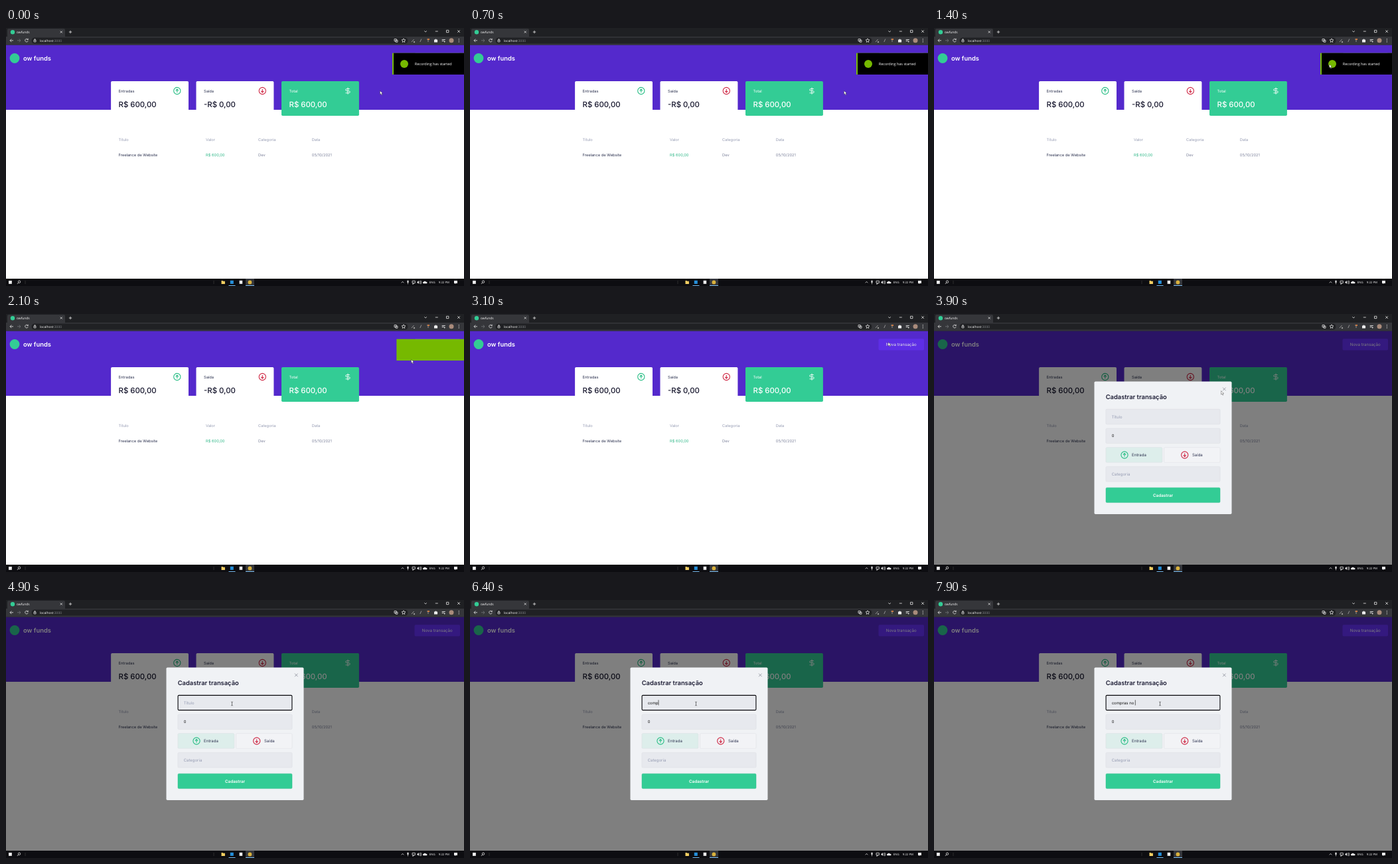
An HTML page for the animation above (8 s loop, 690x388 px).

```html
<!DOCTYPE html>
<html lang="pt">
<head>
<meta charset="utf-8">
<title>Transações</title>
<style>
html, body { margin: 0; width: 100%; height: 100%; overflow: hidden; background: #fff; }
svg { display: block; }
text { font: 5.75px Inter, sans-serif; fill: #2d3350; white-space: pre; text-rendering: geometricPrecision; }
.ui { font: 4.9px "Open Sans", sans-serif; fill: #fff; }
.big { font-size: 11.4px; font-weight: 500; fill: #15152c; }
.white { fill: #fff; }
.muted { fill: #969cb3; }
.line { fill: none; stroke: #e8e8e8; stroke-width: .8; }
.field { fill: #e7e9ee; stroke: #d7d9de; stroke-width: .4; }
.mid { text-anchor: middle; }
#modal .title { font-size: 9.35px; font-weight: 600; fill: #1c1c34; }
#modal .submit { font-size: 6.3px; font-weight: 600; }
#modal .option, #titleText { font-size: 6px; }
#modal.fallback .title, #modal.fallback .submit { font-family: "Liberation Sans", sans-serif; font-weight: 700; }
#modal.fallback .title { font-size: 8.6px; }
#modal.fallback .submit { font-size: 5.75px; }
#modal.fallback .value { font-weight: 600; }
</style>
</head>
<body>
<svg width="690" height="388" viewBox="0 0 690 388">
  <defs>
    <g id="up" fill="none" stroke="#27bd84" stroke-width="1.1">
      <circle r="5.100"/><path d="M0 2.6V-2.4M-2.1-.3L0-2.4 2.1-.3"/>
    </g>
    <g id="down" fill="none" stroke="#cf2744" stroke-width="1.1">
      <circle r="5.100"/><path d="M0-2.6V2.4M-2.1 .3L0 2.4 2.1 .3"/>
    </g>
  </defs>

  <!-- page -->
  <rect y="25" width="690" height="98" fill="#5429cc"/>
  <circle cx="13" cy="45.500" r="7.400" fill="#33cc95"/>
  <text x="26" y="48.600" class="white" style="font-size:9.4px;font-weight:600">ow funds</text>
  <g id="newButton">
    <rect x="615.500" y="37.300" width="68.500" height="17.200" rx="1.800" fill="#6933ff"/>
    <text x="649.700" y="48" class="white mid" style="font-size:6.200px">Nova transação</text>
  </g>

  <g fill="#fff">
    <rect x="158.100" y="80" width="116.900" height="52" rx="1.800"/>
    <rect x="286.500" y="80" width="116.900" height="52" rx="1.800"/>
    <rect x="415" y="80" width="116.900" height="52" rx="1.800" fill="#33cc95"/>
  </g>
  <text x="169.500" y="96.600">Entradas</text>
  <text x="298" y="96.600">Saída</text>
  <text x="426.500" y="96.600" class="white">Total</text>
  <text x="169.500" y="118.600" class="big">R$ 600,00</text>
  <text x="298" y="118.600" class="big">-R$ 0,00</text>
  <text x="426.500" y="118.600" class="big white">R$ 600,00</text>
  <use href="#up" x="257.800" y="94.500"/>
  <use href="#down" x="386.300" y="94.500"/>
  <path d="M515 89.500v10.200M517.800 91.500h-4.400a1.500 1.500 0 0 0 0 3.100h3.200a1.500 1.500 0 0 1 0 3.100h-5" fill="none" stroke="#fff" stroke-width=".9"/>

  <text x="169.500" y="169.700" class="muted">Título</text>
  <text x="301" y="169.700" class="muted">Valor</text>
  <text x="380" y="169.700" class="muted">Categoria</text>
  <text x="460.800" y="169.700" class="muted">Data</text>
  <text x="169.500" y="193">Freelance de Website</text>
  <text x="301" y="193" style="fill:#33b98a">R$ 600,00</text>
  <text x="380" y="193" style="fill:#7d829b">Dev</text>
  <text x="460.800" y="193" style="fill:#7d829b">05/10/2021</text>

  <!-- dialog -->
  <g id="modal">
    <rect y="25" width="690" height="352" opacity=".5"/>
    <rect id="panel" x="241.500" width="207" rx="1.800" fill="#f0f2f5"/>
    <text x="258.700" y="128.300" class="title">Cadastrar transação</text>
    <path d="M435 110.600l4.600 4.600M439.600 110.600l-4.600 4.600" class="line" style="stroke:#8b8d98"/>
    <g id="form">
      <rect x="258.900" y="143.100" width="172.200" height="22.700" rx="1.600" class="field"/>
      <rect id="focusRing" x="259.100" y="143.400" width="171.800" height="22.200" rx="1.400" fill="none" stroke="#08080c" stroke-width="1.100"/>
      <text id="titleText" x="267.700" y="156.700"></text>
      <path id="caret" d="M0 150.400v8" stroke="#222" stroke-width=".7"/>
      <rect x="258.900" y="171.900" width="172.200" height="22.700" rx="1.600" class="field"/>
      <text x="267.700" y="185.400" class="value" style="fill:#111">0</text>
      <rect x="258.900" y="200.600" width="85" height="22.700" rx="1.600" style="fill:#ddeeeb" class="field"/>
      <rect x="346.600" y="200.600" width="84.500" height="22.700" rx="1.600" style="fill:#f2f3f6" class="field"/>
      <use href="#up" x="287" y="212"/>
      <use href="#down" x="377.700" y="212"/>
      <text x="298" y="214.200" class="option">Entrada</text>
      <text x="389" y="214.200" class="option">Saída</text>
      <rect x="258.900" y="229.400" width="172.200" height="22.700" rx="1.600" class="field"/>
      <text x="267.700" y="243" class="muted option">Categoria</text>
      <rect x="259" y="261.200" width="172" height="22.400" rx="1.600" fill="#33cc95" stroke="#2bbd88" stroke-width=".5"/>
      <text x="345" y="274.500" class="submit white mid">Cadastrar</text>
    </g>
  </g>

  <!-- recording notice -->
  <rect id="noticeBack" x="582" y="37.700" width="108" height="32.300" fill="#76b900"/>
  <g id="notice">
    <rect x="584" y="37.700" width="108" height="32.300"/>
    <circle cx="600" cy="54" r="6" fill="#76b900"/>
    <text x="615.800" y="56.300" class="ui" style="font-size:5.5px">Recording has started</text>
  </g>

  <!-- browser -->
  <rect width="690" height="25.400" fill="#1f2023"/>
  <path d="M0 13h2V3q0-2 2-2h83q2 0 2 2v10h601v12.400H0z" fill="#35363a"/>
  <rect x="38.500" y="14.500" width="567" height="9" rx="4.500" fill="#202124"/>
  <circle cx="10" cy="6.200" r="3.200" fill="#33cc95"/>
  <text x="16" y="8" class="ui">owfunds</text>
  <text x="51" y="20.700" class="ui">localhost<tspan fill="#8c8f94">:3000</tspan></text>
  <g class="line">
    <path d="M81.800 4.500l3 3M84.800 4.500l-3 3M94.800 6h4.400M97 3.800v4.400"/>
    <path d="M11 18.800H6M8.300 16.500L6 18.800l2.300 2.300"/>
    <path d="M17 18.800h5M19.700 16.500l2.300 2.300-2.300 2.300" stroke="#77797d"/>
    <path d="M33 17.400a2.300 2.300 0 1 0 .2 2M33.200 15.800v1.800h-1.800"/>
    <path d="M42 18.300h3v2.500h-3zM42.700 18.300v-1a.8.800 0 0 1 1.600 0v1"/>
    <path d="M630.300 4.300l1.800 1.700 1.800-1.700M646.800 5h4M663.500 3.300h3.400v3.400h-3.400zM680.300 3.300l3.600 3.600M683.900 3.300l-3.600 3.600"/>
    <path d="M599 15.800l.9 1.900 2 .2-1.500 1.400.4 2.100-1.800-1-1.800 1 .4-2.100-1.500-1.400 2-.2z"/>
    <path d="M585 16.500h3.200v3.200H585zM587 18.200h3v3h-3z"/>
    <path d="M611 21l3.600-4M623.800 21l2-4.500M634 17h4M636 17v4" stroke="#aaa"/>
  </g>
  <circle cx="615" cy="21" r="1.200" fill="#999"/>
  <rect x="635" y="16" width="3" height="2" fill="#c87942"/>
  <path d="M645 17.500h1.500a1 1 0 0 1 2 0h1.500V19a1 1 0 0 1 0 1.400v1.100h-5z" fill="#eee"/>
  <path d="M656.700 17h5v1h-5zM656.700 19h3v1h-3zM660 19l2 1.500-2 1.300z" fill="#ddd"/>
  <circle cx="671" cy="18.800" r="3.500" fill="#a98b7b"/>
  <g fill="#ddd"><circle cx="682.300" cy="16.700" r=".6"/><circle cx="682.300" cy="18.800" r=".6"/><circle cx="682.300" cy="20.900" r=".6"/></g>

  <!-- taskbar -->
  <rect y="377" width="690" height="11" fill="#0d0d11"/>
  <rect x="361" y="377" width="13" height="11" fill="#35373c"/>
  <path d="M335.500 387.500h10M361 387.500h13" stroke="#76b9ed"/>
  <path d="M29 380v5M313 380v5" stroke="#444" stroke-width=".6"/>
  <rect x="4" y="380" width="4.800" height="4.800" fill="#f3f3f3"/>
  <path d="M324.500 380h2l.7.800h2.700v4.200h-5.400z" fill="#f4cf62"/>
  <rect x="337.800" y="379.800" width="5" height="5" fill="#2490dc"/>
  <rect x="351.600" y="379.800" width="4.600" height="5" fill="#eee"/>
  <circle cx="367.400" cy="382.400" r="2.900" fill="#d9b13c"/>
  <g class="line">
    <circle cx="20" cy="381.700" r="1.700"/><path d="M18.800 383l-2 2"/>
    <path d="M595.600 383.300l1.900-1.900 1.900 1.900M612 380.500h4.400v3H612zM614 383.500v1.600h-2M623.300 380.500q1.200 2 0 4M624.800 379.800q1.800 2.700 0 5.400"/>
  </g>
  <path d="M604.500 379.700h2v3.400h-2zM605.200 383h.7v2.200h-.7zM619.500 381.500h1l1.500-1.500v4.800l-1.500-1.300h-1zM628.800 384.300a1.300 1.300 0 0 1 .4-2.500 2 2 0 0 1 3.600 0 1.300 1.300 0 0 1 .8 2.500zM675 380h5v4h-2.300l-1.200 1.300V384H675z" fill="#eee"/>
  <text x="637.800" y="384" class="ui" style="font-size:4.300px">ENG</text>
  <text x="651.800" y="384" class="ui" style="font-size:4.300px">9:22 PM</text>

  <path id="arrow" d="M0 0v5.400l1.300-1.200 1 2.200 1-.4-1-2.200h1.700z" fill="#fff" stroke="#111" stroke-width=".35"/>
  <path id="beam" d="M-1.300-2.800Q0-2.800 0-2.200 0-2.800 1.300-2.800M0-2.200V2.200M-1.300 2.800Q0 2.800 0 2.200 0 2.800 1.300 2.800" fill="none" stroke="#333" stroke-width=".65"/>
</svg>
<script>
const $ = id => document.getElementById(id);
const show = (id, on) => $(id).setAttribute("visibility", on ? "inherit" : "hidden");
const move = (id, x, y = 0) => $(id).setAttribute("transform", `translate(${x} ${y})`);
const clamp = v => Math.min(1, Math.max(0, v));

const LOOP = 8000, MODAL = 3200, FONT = 3300, FOCUS = 4200;
const phrase = "compras no ";
const keyTimes = [6000, 6100, 6200, 6400, 6500, 6600, 6700, 6900, 7400, 7700, 7900];
// time, x, y
const path = [
  [0, 563.5, 94.5], [850, 563.5, 94.5], [1300, 595, 54], [1500, 596, 55], [1800, 604, 64],
  [2100, 610.5, 68.5], [2400, 610.5, 68.5], [2700, 630, 42.5], [3400, 630, 42.5],
  [3800, 450, 108], [4200, 340.5, 156], [LOOP, 340.5, 156]
];

function pointer(t) {
  const i = path.findIndex(p => p[0] > t);
  const [t0, x0, y0] = path[i - 1], [t1, x1, y1] = path[i];
  let k = (t - t0) / (t1 - t0);
  k = k * k * (3 - 2 * k);
  return [x0 + (x1 - x0) * k, y0 + (y1 - y0) * k];
}

const slideOut = (t, start) => 108 * clamp((t - start) / 300) ** 2.6;

function caretOn(t) {
  if (t < 6000) return t < 4700 || (t >= 5300 && t < 5800);
  const last = keyTimes.filter(k => k <= t).pop();
  return t - last < 500;
}

function draw(t) {
  const [x, y] = pointer(t);
  const overField = t > MODAL && x > 259 && x < 431 && y > 142 && y < 166;
  show("arrow", !overField);
  show("beam", overField);
  move("arrow", x, y);
  move("beam", x, y);

  move("notice", slideOut(t, 1750));
  move("noticeBack", slideOut(t, 2000));
  const hover = t < 3500 ? clamp((t - 2600) / 200) : 0;
  $("newButton").style.filter = `brightness(${1 - .1 * hover})`;

  const fallback = t < FONT, focused = t >= FOCUS;
  show("modal", t >= MODAL);
  $("modal").classList.toggle("fallback", fallback);
  $("panel").setAttribute("y", fallback ? 102.8 : 101.4);
  $("panel").setAttribute("height", fallback ? 197 : 199.7);
  move("form", 0, fallback ? -1.2 : 0);

  const typed = phrase.slice(0, keyTimes.filter(k => k <= t).length);
  const text = $("titleText");
  text.textContent = typed || "Título";
  text.style.fill = typed ? "#111" : "#969cb3";
  show("focusRing", focused);
  show("caret", focused && caretOn(t));
  move("caret", 268 + (typed ? text.getComputedTextLength() : 0));
}

function frame() {
  draw(performance.now() % LOOP);
  requestAnimationFrame(frame);
}
frame();
</script>
</body>
</html>
```
